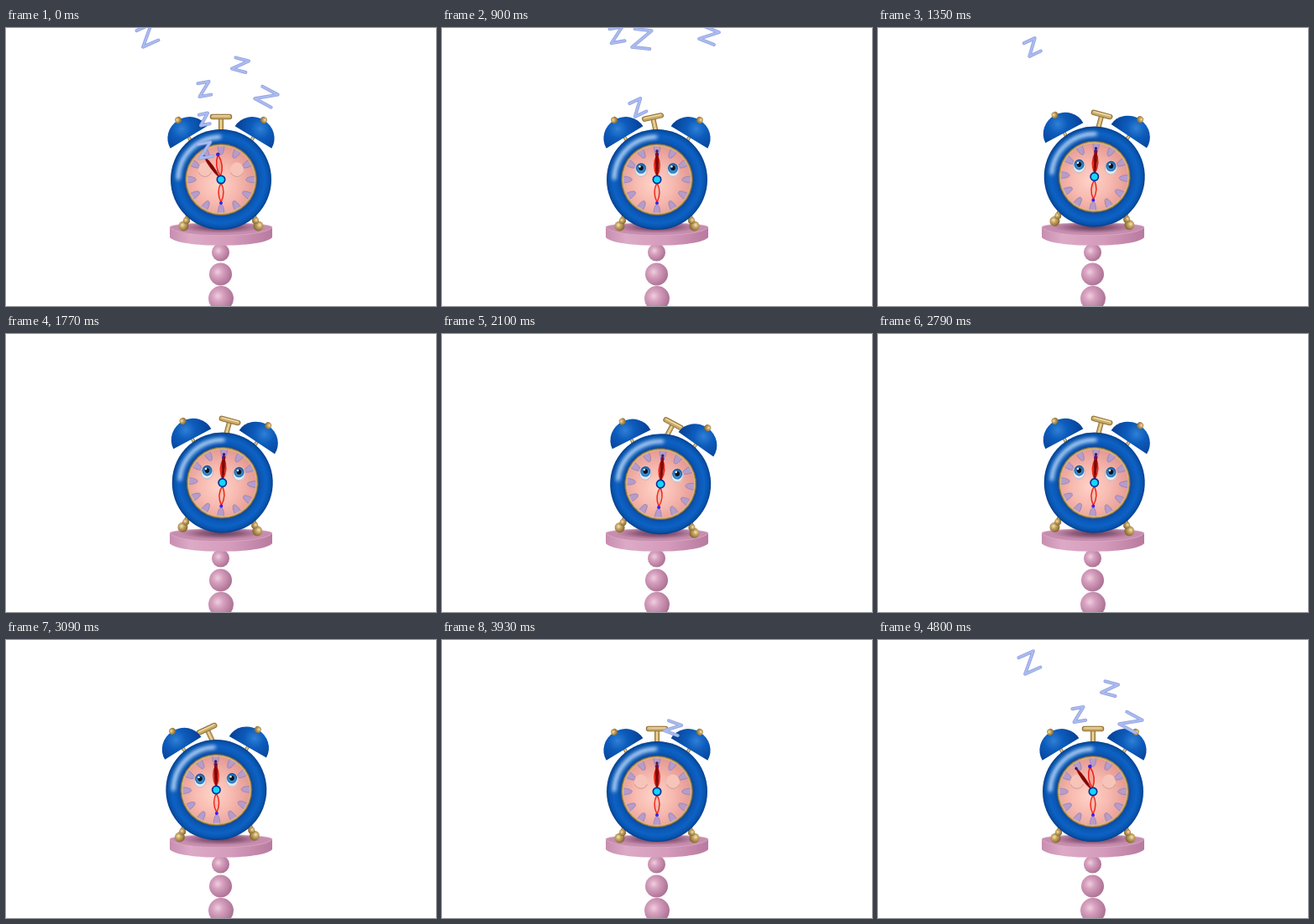
Write an HTML page with a canvas that moves like this. It is 512x332 px and loops after 4890 ms.

```html
<!DOCTYPE html>
<html lang="en">
<head>
<meta charset="utf-8">
<title>Alarm clock</title>
<style>
  html, body { margin: 0; height: 100%; overflow: hidden; background: #fff; }
  canvas { display: block; }
</style>
</head>
<body>
<canvas id="stage" width="512" height="332"></canvas>
<script>
const g = document.getElementById('stage').getContext('2d');
const LOOP = 4890, STEP = 30, TAU = Math.PI * 2, RAD = Math.PI / 180;

const ramp = (t, a, b) => Math.min(1, Math.max(0, (t - a) / (b - a)));
// Rises over a..b, falls back over c..d
const pulse = (t, a, b, c, d) => ramp(t, a, b) * (1 - ramp(t, c, d));

// Snores: time, x, y, vx, vy (px/ms), lowest y, width, height, tilt
const snores = [
  [4800, 180, 27, -.133, -.2, 146, 20, 21, -24],
  [4800, 276, 58, .033, -.155, 146, 17, 14, 15],
  [4800, 239, 89, -.033, -.178, 146, 14, 16, -10],
  [4800, 301, 98, .1, -.178, 146, 22, 17, 28],
  [0, 236, 109, -.12, -.17, 115, 11, 13, -12],
  [0, 237, 146, -.032, -.153, 148, 16, 17, -10],
  [900, 238, 13, .02, -.19, 146, 21, 22, 6],
  [900, 318, 9, .1, -.18, 146, 19, 16, 22],
  [900, 233, 95, -.11, -.16, 146, 15, 17, -25],
  [3930, 275, 105, .075, -.15, 111, 17, 13, 20]
];

function radial(x, y, r, ...stops) {
  const fill = g.createRadialGradient(x, y, 0, x, y, r);
  stops.forEach(([at, color]) => fill.addColorStop(at, color));
  return fill;
}

function oval(x, y, rx, ry, fill, stroke, width = 1) {
  g.beginPath();
  g.ellipse(x, y, rx, ry, 0, 0, TAU);
  if (fill) { g.fillStyle = fill; g.fill(); }
  if (stroke) { g.strokeStyle = stroke; g.lineWidth = width; g.stroke(); }
}

function line(points, color, width, cap = 'round') {
  g.beginPath();
  points.forEach(([x, y]) => g.lineTo(x, y));
  g.strokeStyle = color;
  g.lineWidth = width;
  g.lineCap = cap;
  g.lineJoin = 'round';
  g.stroke();
}

function placed(x, y, degrees, draw, flip = 1) {
  g.save();
  g.translate(x, y);
  g.scale(flip, 1);
  g.rotate(degrees * RAD);
  draw();
  g.restore();
}

function ball(x, y, r, light, mid, dark) {
  oval(x, y, r, r, radial(x - r * .25, y - r * .2, r * 1.3, [0, light], [.35, mid], [1, dark]));
}

const goldBall = (x, y, r) => ball(x, y, r, '#f6e6b8', '#c9a968', '#80622c');

function goldRod(points, width) {
  line(points, '#8f7038', width, 'butt');
  line(points, '#c9aa68', width * .7, 'butt');
  line(points, '#efdca6', width * .25, 'butt');
}

function pedestal() {
  [[255.5, 268, 10.5], [255.5, 294, 13.5], [256, 323, 15]].forEach(([x, y, r]) =>
    ball(x, y, r, '#efcfdf', '#d6a0be', '#ab6f92'));
  const side = g.createLinearGradient(195, 0, 317, 0);
  [[0, '#c78db0'], [.2, '#dcaac6'], [.6, '#d49bbb'], [1, '#b87a9f']].forEach(s => side.addColorStop(...s));
  g.beginPath();
  g.moveTo(195, 238);
  g.lineTo(195, 250);
  g.bezierCurveTo(205, 263, 307, 263, 317, 250);
  g.lineTo(317, 238);
  g.fillStyle = side;
  g.fill();
  g.beginPath();
  g.moveTo(195, 238);
  g.bezierCurveTo(195, 231, 317, 231, 317, 238);
  g.bezierCurveTo(307, 251, 205, 251, 195, 238);
  g.fillStyle = '#c68dae';
  g.fill();
  g.strokeStyle = '#dfaec9';
  g.lineWidth = .7;
  g.stroke();
  g.save();
  g.translate(256, 238);
  g.scale(1, .15);
  oval(0, 0, 48, 48, radial(0, 0, 48, [0, 'rgba(70,35,60,.75)'], [.5, 'rgba(90,45,75,.5)'], [1, 'rgba(120,60,95,0)']));
  g.restore();
}

function bell() {
  goldRod([[0, -2], [0, 12]], 4);
  g.beginPath();
  g.ellipse(0, 0, 25.5, 24, 0, Math.PI, TAU);
  g.closePath();
  g.fillStyle = radial(-2, -13, 29, [0, '#2f80d6'], [.4, '#0d5cbc'], [1, '#064196']);
  g.fill();
  goldRod([[0, -24], [0, -21]], 5);
  goldBall(0, -24, 4);
}

function leg() {
  goldRod([[-36, 38], [-44, 54]], 6);
  goldBall(-44.5, 55.5, 6);
  goldBall(-41, 49, 4);
}

function hammer() {
  goldRod([[0, 0], [0, -22]], 6);
  line([[-10, -24], [10, -24]], '#8f7038', 6.5);
  line([[-10, -24], [10, -24]], '#c9aa68', 4.5);
  line([[-10, -25], [10, -25]], '#efdca6', 1.5);
}

function hand(degrees, length, width, fill, stroke) {
  placed(0, 0, degrees, () => {
    g.beginPath();
    g.moveTo(0, -4);
    g.quadraticCurveTo(width, -length * .55, 0, -length);
    g.quadraticCurveTo(-width, -length * .55, 0, -4);
    g.fillStyle = fill;
    g.fill();
    g.strokeStyle = stroke;
    g.lineWidth = 1.5;
    g.stroke();
  });
}

function hourMark() {
  g.beginPath();
  g.moveTo(-3.8, -39.5);
  g.bezierCurveTo(-3.2, -26.5, 3.2, -26.5, 3.8, -39.5);
  g.fillStyle = '#b69cc9';
  g.fill();
  g.strokeStyle = '#9480b8';
  g.lineWidth = .8;
  g.stroke();
}

function eye(x, open) {
  const y = -12.5;
  oval(x, y + 1, 8, 9, '#f7c4b9');
  if (open > 0) {
    g.save();
    g.beginPath();
    g.rect(x - 9, y - 9, 18, 19 * open);
    g.clip();
    oval(x, y + 1, 7, 8, '#dfeaf6', '#b09aa4', .6);
    oval(x, y - 1, 6, 6.3, radial(x, y, 6.3, [0, '#5ab0ea'], [.6, '#3585c8'], [1, '#1f5a98']));
    oval(x, y - 1.2, 2.8, 3, '#081424');
    oval(x - 1.5, y - 3, 1.2, 1.2, '#fff');
    g.restore();
  }
  if (open < 1) {
    g.beginPath();
    g.arc(x, y + 1, 8, .12 * Math.PI, .88 * Math.PI);
    g.strokeStyle = '#d09a90';
    g.lineWidth = 1;
    g.stroke();
  }
}

function face(t) {
  oval(0, 0, 42.5, 42.5, '#b59358', '#7c6238', .8);
  oval(0, 0, 40.5, 40.5, radial(-4, 5, 45, [0, '#ffd3c8'], [.5, '#f7bab0'], [1, '#e59a94']), '#dcc088', 1);
  for (let i = 0; i < 12; i++) placed(0, 0, i * 30, hourMark);
  const open = pulse(t, 600, 840, 3600, 3870);
  eye(-19, open);
  eye(19, open);

  const back = 1 - pulse(t, 90, 870, 4350, 4440);
  hand(180, 27, 6, '#f5bcb0', '#ee2a1c');
  oval(0, 28, 2, 2, '#3a20f0');
  hand(-7 * back, 30, 6.5, '#f5a598', '#ee2015');
  oval(-30 * Math.sin(7 * back * RAD), -30, 2.3, 2.3, '#3020f0');
  hand(-36 * back, 34, 3, '#7c0505', '#8e0c08');
  placed(0, 0, -36 * back, () => oval(0, -34, 1.7, 1.7, '#35206c'));
  oval(0, 0, 4.7, 4.7, '#12d8f8', '#0b2f9a', 1.7);
}

function body(t) {
  oval(0, 0, 60, 60, radial(0, 0, 60,
    [.7, '#0a4799'], [.78, '#0b59b8'], [.87, '#0d62c4'], [.95, '#0854ae'], [1, '#063f8c']));
  // Soft gloss on the upper left of the rim
  g.save();
  g.filter = 'blur(2px)';
  g.beginPath();
  g.arc(0, 0, 51, 182 * RAD, 268 * RAD);
  g.strokeStyle = 'rgba(225,240,255,.85)';
  g.lineWidth = 4.5;
  g.lineCap = 'round';
  g.stroke();
  g.restore();
  face(t);
}

function clock(t) {
  const swing = Math.cos(TAU * (t - 2460) / 180);
  const rock = pulse(t, 900, 1140, 3330, 3450);
  const strike = pulse(t, 840, 900, 3330, 3600);
  const shift = rock * (2.3 * swing - 2.3);
  const hop = rock * (4 - 2 * swing * swing);
  placed(256 + shift, 237 - hop, rock * (1.6 + 2.7 * swing), () => {
    g.translate(0, -56);
    leg();
    placed(0, 0, 0, leg, -1);
    placed(0, -51, 24 * swing * strike, hammer);
    placed(-38.5, -50.5, -31, bell);
    placed(38.5, -50.5, -31, bell, -1);
    body(t);
  });
}

function snore(t, [at, x, y, vx, vy, lowest, w, h, tilt]) {
  const dt = ((t - at + LOOP * 1.5) % LOOP) - LOOP / 2;
  const top = y + vy * dt;
  if (top > lowest || top < -25) return;
  placed(x + vx * dt, top, tilt, () => {
    const zigzag = [[-w * .45, -h / 2], [w / 2, -h / 2], [-w / 2, h / 2], [w / 2, h / 2]];
    line(zigzag, '#98a5e2', 4);
    line(zigzag, '#aabcf0', 2.2);
  });
}

function frame(now) {
  const t = Math.floor((now % LOOP) / STEP) * STEP;
  g.fillStyle = '#fff';
  g.fillRect(0, 0, 512, 332);
  pedestal();
  clock(t);
  snores.forEach(z => snore(t, z));
  requestAnimationFrame(frame);
}

frame(0);
</script>
</body>
</html>
```
